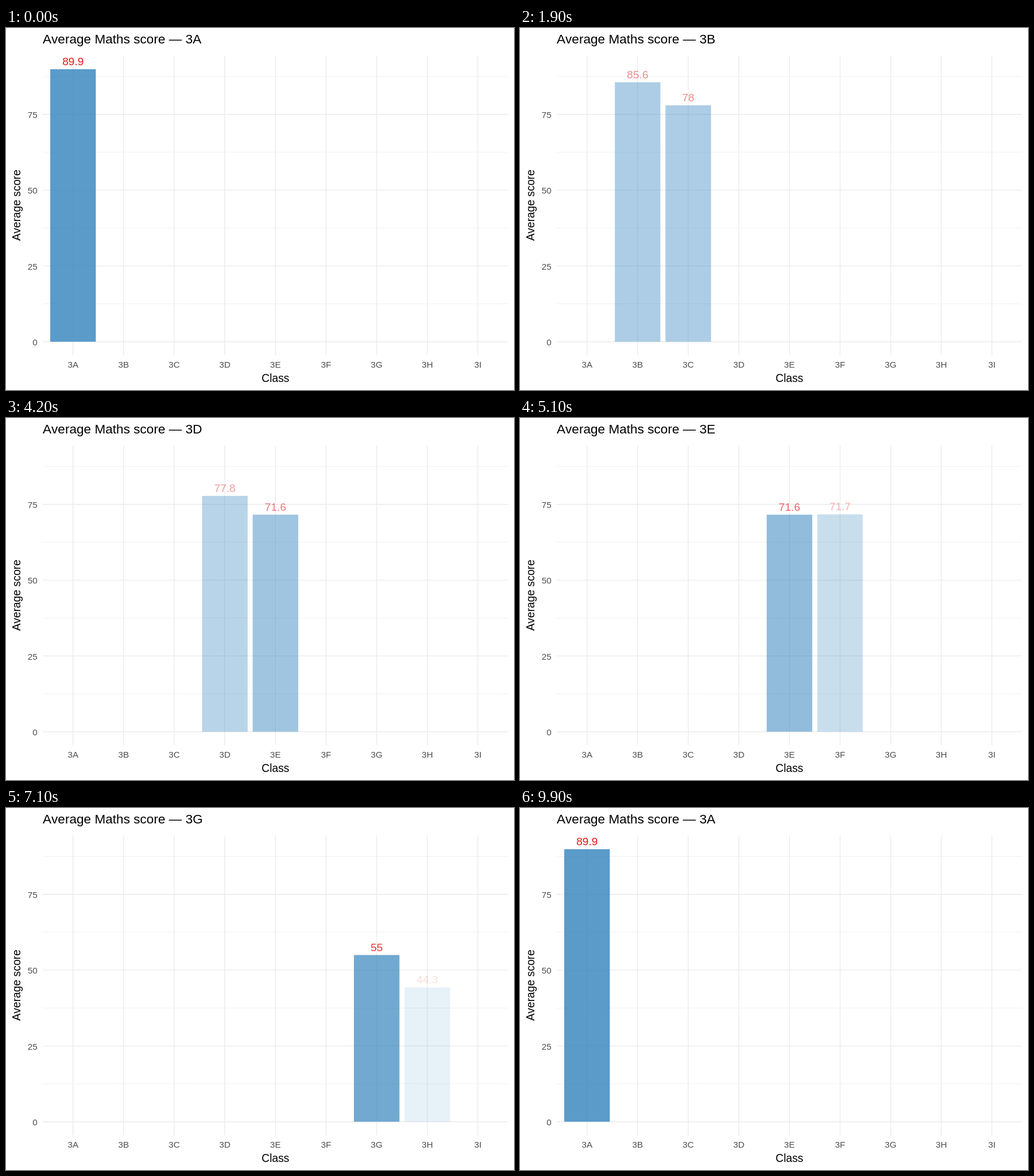
An HTML page with a canvas for the animation above (10 s loop, 885 by 632 pixels).

```html
<!DOCTYPE html>
<html lang="en">
<head>
<meta charset="utf-8">
<title>Average Maths score</title>
<style>
html, body { margin: 0; width: 100%; height: 100%; overflow: hidden; background: #fff; }
canvas { display: block; }
</style>
</head>
<body>
<canvas id="chart" width="885" height="632"></canvas>
<script>
const ctx = document.getElementById('chart').getContext('2d');
const FONT = '"Liberation Sans", Arial, sans-serif';
const scores = [89.9, 85.6, 78, 77.8, 71.6, 71.7, 55, 44.3, 27.2];
const names = [...'ABCDEFGHI'].map(c => '3' + c);

// Times in steps of 100 ms: every class rests, then fades into the next.
const STEP = 100, REST = 4;
const fades = [8, 8, 7, 7, 6, 7, 7, 7, 7];
const TOTAL = fades.reduce((sum, n) => sum + n + REST, 0);

const panel = { left: 64, right: 874.7, top: 48, bottom: 571.6 };
const BAR = 79.35;
const xAt = i => 116.75 + 88.17 * i;
const yAt = v => 547.7 - 5.292 * v;

function line(x1, y1, x2, y2, width) {
  ctx.lineWidth = width;
  ctx.beginPath();
  ctx.moveTo(x1, y1);
  ctx.lineTo(x2, y2);
  ctx.stroke();
}

function label(str, x, y, size, color, align) {
  ctx.font = size + 'px ' + FONT;
  ctx.fillStyle = color;
  ctx.textAlign = align;
  ctx.fillText(str, x, y);
}

function drawAxes() {
  ctx.strokeStyle = '#ebebeb';
  for (let v = 12.5; v < 90; v += 25) line(panel.left, yAt(v), panel.right, yAt(v), 0.7);
  for (let v = 0; v < 90; v += 25) {
    line(panel.left, yAt(v), panel.right, yAt(v), 1.37);
    label(v, 54.8, yAt(v) + 6.3, 15.3, '#4d4d4d', 'right');
  }
  names.forEach((name, i) => {
    line(xAt(i), panel.top, xAt(i), panel.bottom, 1.37);
    label(name, xAt(i), 592.5, 15.3, '#4d4d4d', 'center');
  });
  label('Class', 469.4, 617.5, 19.3, '#000', 'center');
  ctx.save();
  ctx.translate(25, 309.4);
  ctx.rotate(-Math.PI / 2);
  label('Average score', 0, 0, 19.3, '#000', 'center');
  ctx.restore();
}

function drawBar(i, alpha) {
  const x = xAt(i), y = yAt(scores[i]);
  ctx.globalAlpha = 0.8 * alpha;
  ctx.fillStyle = '#3182bd';
  ctx.fillRect(x - BAR / 2, y, BAR, yAt(0) - y);
  ctx.globalAlpha = alpha;
  label(scores[i], x, y - 6.8, 19.1, '#e31a1c', 'center');
  ctx.globalAlpha = 1;
}

function stateAt(ms) {
  let step = Math.floor(ms / STEP) % TOTAL, i = 0;
  while (step >= REST + fades[i]) step -= REST + fades[i++];
  const k = Math.max(0, step - REST + 1);
  const next = (i + 1) % names.length;
  return { i, next, p: k / fades[i], title: k > Math.ceil(fades[i] / 2) ? next : i };
}

function draw(ms) {
  const s = stateAt(ms);
  ctx.fillStyle = '#fff';
  ctx.fillRect(0, 0, 885, 632);
  drawAxes();
  if (s.p < 1) drawBar(s.i, 1 - s.p);
  if (s.p > 0) drawBar(s.next, s.p);
  label('Average Maths score — ' + names[s.title], 64, 27, 22.6, '#000', 'left');
}

ctx.fontKerning = 'none';
const start = performance.now();
function tick() {
  draw(performance.now() - start);
  requestAnimationFrame(tick);
}
tick();
</script>
</body>
</html>
```
